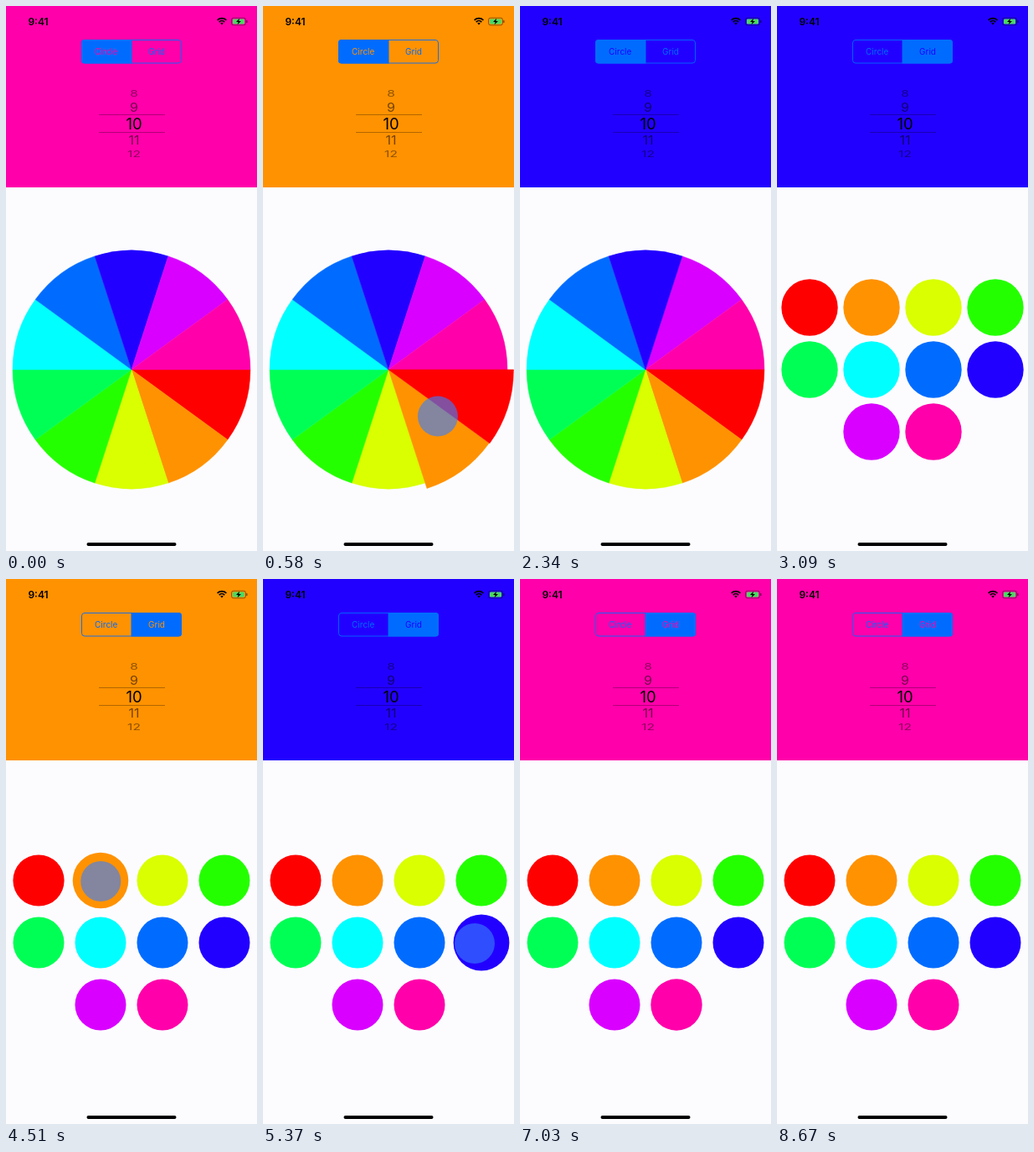
These frames come from a looping animation (300 px wide and 649 px high, 8810 ms). An HTML page with a canvas:

```html
<!DOCTYPE html>
<html lang="en">
<head>
<meta charset="utf-8">
<title>Color picker</title>
<style>
  html, body { margin: 0; width: 100%; height: 100%; overflow: hidden; background: #fcfcff; }
  canvas { display: block; width: 300px; height: 649px; }
</style>
</head>
<body>
<canvas id="stage"></canvas>
<script>
const W = 300, H = 649, LOOP = 8810;
const COLORS = ['#ff0000', '#ff9200', '#d9ff00', '#24ff00', '#00ff55',
                '#00ffff', '#006cff', '#2200ff', '#d900ff', '#ff00aa'];
const BLUE = '#006cff';
const FONT = 'Inter, "Liberation Sans", sans-serif';
const TAU = Math.PI * 2, STEP = TAU / 10;

const canvas = document.getElementById('stage');
const ctx = canvas.getContext('2d');
const ratio = window.devicePixelRatio || 1;
canvas.width = W * ratio;
canvas.height = H * ratio;

const clamp = (v, lo = 0, hi = 1) => Math.min(hi, Math.max(lo, v));

// Wheel drag: constant angular speed, clockwise from red to indigo.
const wheel = { x: 150, y: 433, r: 142, down: 440, up: 1780, grow: 0.083, release: 110 };
const DEG_PER_MS = 0.192;
const dragAngle = t => 143 + (t - 1100) * DEG_PER_MS;
const timeAtAngle = deg => 1100 + (deg - 143) / DEG_PER_MS;

// Grid drag: winds through the cells, row by row.
const grid = { r: 30.5, down: 4150, up: 6900, grow: 0.1, release: 50 };
const SHOW_GRID = 2800;
const cell = i => ({ x: 39 + 74 * (i < 8 ? i % 4 : i - 7), y: 359 + 74 * Math.floor(i / 4) });
const stops = [0, 1, 2, 3, 7, 6, 5, 4, 8, 9].map((i, k) => ({
  i, ...cell(i), t: k < 8 ? 4233 + 277 * k : 6600 + 270 * (k - 8)
}));

function gridTouch(t) {
  let k = 0;
  while (k < stops.length - 2 && t > stops[k + 1].t) k++;
  const a = stops[k], b = stops[k + 1];
  const u = clamp((t - a.t) / (b.t - a.t));
  return { x: a.x + (b.x - a.x) * u, y: a.y + (b.y - a.y) * u + 1 };
}

// Time needed to cross one cell radius on the way from a to b.
const crossing = (a, b) => grid.r * (b.t - a.t) / Math.hypot(b.x - a.x, b.y - a.y);

const wheelHits = COLORS.slice(0, 8).map((_, i) => ({
  i,
  from: Math.max(wheel.down, timeAtAngle(36 * i)),
  to: Math.min(wheel.up, timeAtAngle(36 * (i + 1)))
}));
const gridHits = stops.map((s, k) => ({
  i: s.i,
  from: k ? s.t - crossing(stops[k - 1], s) : grid.down,
  to: k < 9 ? s.t + crossing(s, stops[k + 1]) : grid.up
}));
const allHits = [...wheelHits, ...gridHits];

function scaleOf(i, t, hits, view) {
  const hit = hits.find(h => h.i === i);
  if (!hit || t < hit.from) return 1;
  const rise = 1 - Math.exp(-(Math.min(t, hit.to) - hit.from) / 45);
  return 1 + view.grow * rise * Math.exp(-Math.max(0, t - hit.to) / view.release);
}

function background(t) {
  let color = COLORS[9];
  for (const hit of allHits) if (t >= hit.from) color = COLORS[hit.i];
  return color;
}

function disc(x, y, r, fill) {
  ctx.fillStyle = fill;
  ctx.beginPath();
  ctx.arc(x, y, r, 0, TAU);
  ctx.fill();
}

function box(x, y, w, h, r, fill) {
  ctx.beginPath();
  ctx.roundRect(x, y, w, h, r);
  if (fill) {
    ctx.fillStyle = fill;
    ctx.fill();
  } else ctx.stroke();
}

function label(text, x, y, size, fill, weight = 400, squash = 1) {
  ctx.save();
  ctx.translate(x, y);
  ctx.scale(1, squash);
  ctx.font = `${weight} ${size}px ${FONT}`;
  ctx.textAlign = 'center';
  ctx.textBaseline = 'alphabetic';
  ctx.fillStyle = fill;
  ctx.fillText(text, 0, size * 0.364);
  ctx.restore();
}

function drawStatusBar() {
  label('9:41', 38.5, 18.5, 12, '#000', 600);

  ctx.strokeStyle = '#000';
  ctx.lineWidth = 1.7;
  for (const r of [4.6, 7.6]) {
    ctx.beginPath();
    ctx.arc(258, 22.3, r, -Math.PI * 0.75, -Math.PI * 0.25);
    ctx.stroke();
  }
  ctx.fillStyle = '#000';
  ctx.beginPath();
  ctx.moveTo(258, 22.6);
  ctx.arc(258, 22.3, 2.5, -Math.PI * 0.75, -Math.PI * 0.25);
  ctx.fill();

  ctx.lineWidth = 0.8;
  ctx.strokeStyle = 'rgba(0,0,0,.55)';
  box(269.5, 14.2, 17, 8.6, 2.4);
  box(271, 15.6, 14, 5.8, 1.2, '#4cd964');
  box(287.3, 17, 1.2, 3, 0.6, 'rgba(0,0,0,.55)');
  ctx.fillStyle = '#000';
  ctx.beginPath();
  [[279.2, 14.8], [275, 19], [277.6, 19], [276.6, 22.2], [281, 17.9], [278.3, 17.9]]
    .forEach(([x, y]) => ctx.lineTo(x, y));
  ctx.fill();
}

function drawSegments(onGrid, bg) {
  ctx.save();
  ctx.beginPath();
  ctx.roundRect(90, 40, 120, 28.5, 3.5);
  ctx.clip();
  ctx.fillStyle = BLUE;
  ctx.fillRect(onGrid ? 149.5 : 90, 40, 60.5, 29);
  ctx.restore();
  ctx.strokeStyle = BLUE;
  ctx.lineWidth = 0.9;
  box(90.5, 40.5, 119, 27.5, 3.5);
  label('Circle', 119.7, 54.3, 10, onGrid ? BLUE : bg);
  label('Grid', 180, 54.3, 10, onGrid ? bg : BLUE);
}

function drawPicker() {
  label('8', 153, 104, 15.5, 'rgba(0,0,0,.45)', 400, 0.65);
  label('9', 153, 121, 16, 'rgba(0,0,0,.55)', 400, 0.9);
  label('10', 153, 140.3, 18.5, '#000');
  label('11', 153, 159.8, 16, 'rgba(0,0,0,.55)', 400, 0.9);
  label('12', 153, 176.5, 15.5, 'rgba(0,0,0,.45)', 400, 0.65);
  ctx.fillStyle = 'rgba(0,0,0,.38)';
  ctx.fillRect(111, 129, 79, 0.8);
  ctx.fillRect(111, 150, 79, 0.8);
}

function drawWheel(t) {
  COLORS.map((color, i) => ({ color, i, s: scaleOf(i, t, wheelHits, wheel) }))
    .sort((a, b) => a.s - b.s)
    .forEach(({ color, i, s }) => {
      ctx.beginPath();
      ctx.moveTo(wheel.x, wheel.y);
      ctx.arc(wheel.x, wheel.y, wheel.r * s, i * STEP, (i + 1) * STEP);
      ctx.closePath();
      ctx.fillStyle = ctx.strokeStyle = color;
      ctx.lineWidth = 0.5;
      ctx.lineJoin = 'round';
      ctx.fill();
      ctx.stroke();
    });
}

function drawGrid(t) {
  const u = Math.max(0, t - SHOW_GRID - 15) / 1000;
  const spring = 1 - Math.exp(-7.8 * u) * Math.cos(13 * u);
  COLORS.forEach((color, i) => {
    const { x, y } = cell(i);
    disc(x, y, grid.r * spring * scaleOf(i, t, gridHits, grid), color);
  });
}

function drawTouch(t, down, up, { x, y }) {
  const alpha = clamp((t - down) / 80) * clamp(1 - (t - up) / 120);
  if (alpha <= 0) return;
  ctx.globalAlpha = alpha;
  disc(x, y, 24, 'rgba(56,128,255,.62)');
  ctx.globalAlpha = 1;
}

function drawTouches(t) {
  const angle = dragAngle(clamp(t, wheel.down, wheel.up)) * Math.PI / 180;
  drawTouch(t, wheel.down, wheel.up, {
    x: wheel.x + 81 * Math.cos(angle),
    y: wheel.y + 81 * Math.sin(angle)
  });
  drawTouch(t, 2680, SHOW_GRID, { x: 180, y: 54 });
  drawTouch(t, grid.down, grid.up, gridTouch(Math.min(t, grid.up)));
}

function draw(t) {
  const onGrid = t >= SHOW_GRID, bg = background(t);
  ctx.setTransform(ratio, 0, 0, ratio, 0, 0);
  ctx.fillStyle = '#fcfcff';
  ctx.fillRect(0, 0, W, H);
  ctx.fillStyle = bg;
  ctx.fillRect(0, 0, W, 216);
  drawStatusBar();
  drawSegments(onGrid, bg);
  drawPicker();
  if (onGrid) drawGrid(t);
  else drawWheel(t);
  box(96.5, 639, 107, 4, 2, '#000');
  drawTouches(t);
}

const start = performance.now();
function tick() {
  draw((performance.now() - start) % LOOP);
  requestAnimationFrame(tick);
}
tick();
</script>
</body>
</html>
```
